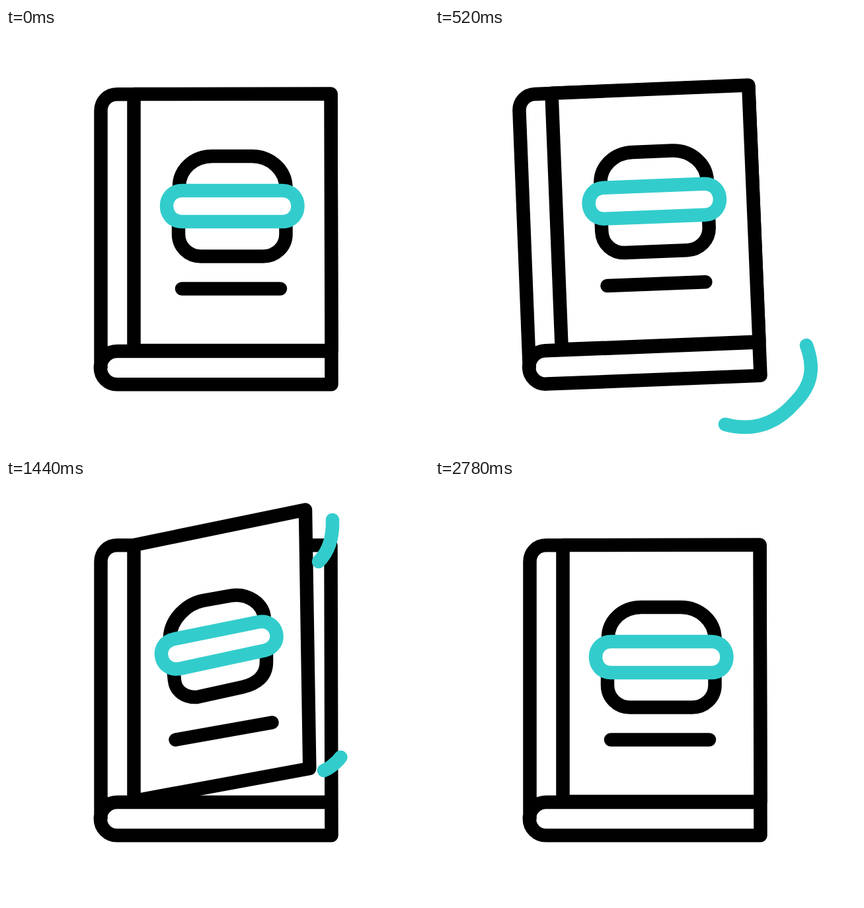
An HTML page for the animation above (3.08 s loop, 640x640 px).

```html
<!DOCTYPE html>
<html lang="en">
<head>
<meta charset="utf-8">
<title>Recipe book</title>
<style>
  html, body { margin: 0; width: 100%; height: 100%; overflow: hidden; background: #fff; }
  svg { display: block; width: 100vw; height: 100vh; }
  path { fill: none; stroke: #000; stroke-width: 20.5; stroke-linecap: round; stroke-linejoin: round; }
  .teal { stroke: #33cccc; }
  .filled { fill: #fff; }
</style>
</head>
<body>
<svg viewBox="0 0 640 640">
  <g id="book">
    <path d="M143.5 514 V125 C143.5 111 154 100.3 168 100.3 H491.5 L492.5 539.3 H168 A25 25 0 0 1 168 489 H492"/>
    <g id="cover"></g>
  </g>
  <g id="lines"></g>
</svg>
<script>
const LOOP = 3080;
const PIVOT = '150.5 532.5';
const book = document.getElementById('book');

function addPath(parentId, className) {
  const path = document.createElementNS('http://www.w3.org/2000/svg', 'path');
  path.setAttribute('class', className);
  document.getElementById(parentId).append(path);
  return path;
}

const smooth = u => {
  const x = Math.min(1, Math.max(0, u));
  return x * x * (3 - 2 * x);
};
const ramp = (t, from, to) => smooth((t - from) / (to - from));

// Interpolates every number of two paths with the same commands.
function mixPaths(a, b, k) {
  const goals = b.match(/-?[\d.]+/g);
  let i = 0;
  return a.replace(/-?[\d.]+/g, n => (+n + (goals[i++] - n) * k).toFixed(2));
}

// Cover parts: class, closed shape, open shape.
const coverParts = [
  ['filled',
    'M193.5 100 L491.5 99.5 L492.5 488 L193.5 488 Z',
    'M193.5 100 L453 46.5 L459.3 438 L193.5 487 Z'],
  ['',
    'M262 240 C262 214 284 194 312 194 L372 194 C400 194 423.5 215 423.5 242',
    'M248 238 C250 212 273 189 298 184 L340 176.5 C365 172 390 188 391 212'],
  ['',
    'M261 298 L261 312 C261 331 276 345.5 295 345.5 L389 345.5 C408 345.5 423.5 331 423.5 312 L423.5 298',
    'M253.5 290 L255 305 C257 322 272 331 289 330 L357 315 C380 310 394 298 394 277 L394 260'],
  ['teal filled',
    'M266.5 246 L418 246 C449.3 246 449.3 293 418 293 L266.5 293 C235.2 293 235.2 246 266.5 246 Z',
    'M255 242 L381 216.5 C411 210 422 252 391 259.5 L263 287 C232 293 223 248 255 242 Z'],
  ['',
    'M266 394.5 L415 394.5',
    'M256.5 394.5 L402.5 368.5']
].map(([className, closed, open]) => ({ path: addPath('cover', className), closed, open }));

// Teal strokes: shape, times when the head runs, times when the tail runs.
const strokes = [
  ['M562 480 C573 510 573 538 545 566 C520 595 486 612 440 600 C422 596 407 589 393 579', [320, 600], [540, 795]],
  ['M473 125 C487 111 495 90 494 62 C492 40 463 30 463 3 C463 -20 474 -30 474 -60', [1245, 1745], [1640, 2130]],
  ['M481 441 C487 439 500 430 507 420 C525 399 550 390 550 362 C550 335 518 330 518 308 C518 290 526 277 531 262', [1320, 1820], [1705, 2205]],
  ['M490 222 C520 222 545 210 552 186 C570 136 524 128 524 88 C524 64 534 52 535.5 25', [1575, 2075], [1960, 2460]]
].map(([d, head, tail]) => {
  const path = addPath('lines', 'teal');
  path.setAttribute('d', d);
  return { path, head, tail, length: path.getTotalLength() };
});

// Wobble of the book: time, angle.
const wobble = [[40, 0], [200, -5.75], [400, 4.4], [600, -5.75], [800, 2.9], [940, 0]];

function wobbleAngle(t) {
  let angle = 0;
  for (let i = 1; i < wobble.length; i++) {
    const [t0, a0] = wobble[i - 1];
    const [t1, a1] = wobble[i];
    angle += (a1 - a0) * ramp(t, t0, t1);
  }
  return angle;
}

function drawStroke({ path, head, tail, length }, t) {
  const start = ramp(t, ...tail) * length;
  const size = ramp(t, ...head) * length - start;
  path.style.visibility = size > 0.5 ? 'visible' : 'hidden';
  path.setAttribute('stroke-dasharray', `${Math.max(size, 0.01)} ${length * 2}`);
  path.setAttribute('stroke-dashoffset', -start);
}

function draw(t) {
  book.setAttribute('transform', `rotate(${wobbleAngle(t)} ${PIVOT})`);
  const openness = ramp(t, 880, 1280) - ramp(t, 2360, 2775);
  for (const { path, closed, open } of coverParts) {
    path.setAttribute('d', mixPaths(closed, open, openness));
  }
  for (const stroke of strokes) drawStroke(stroke, t);
}

const began = performance.now();
function tick() {
  draw((performance.now() - began) % LOOP);
  requestAnimationFrame(tick);
}
tick();
</script>
</body>
</html>
```
